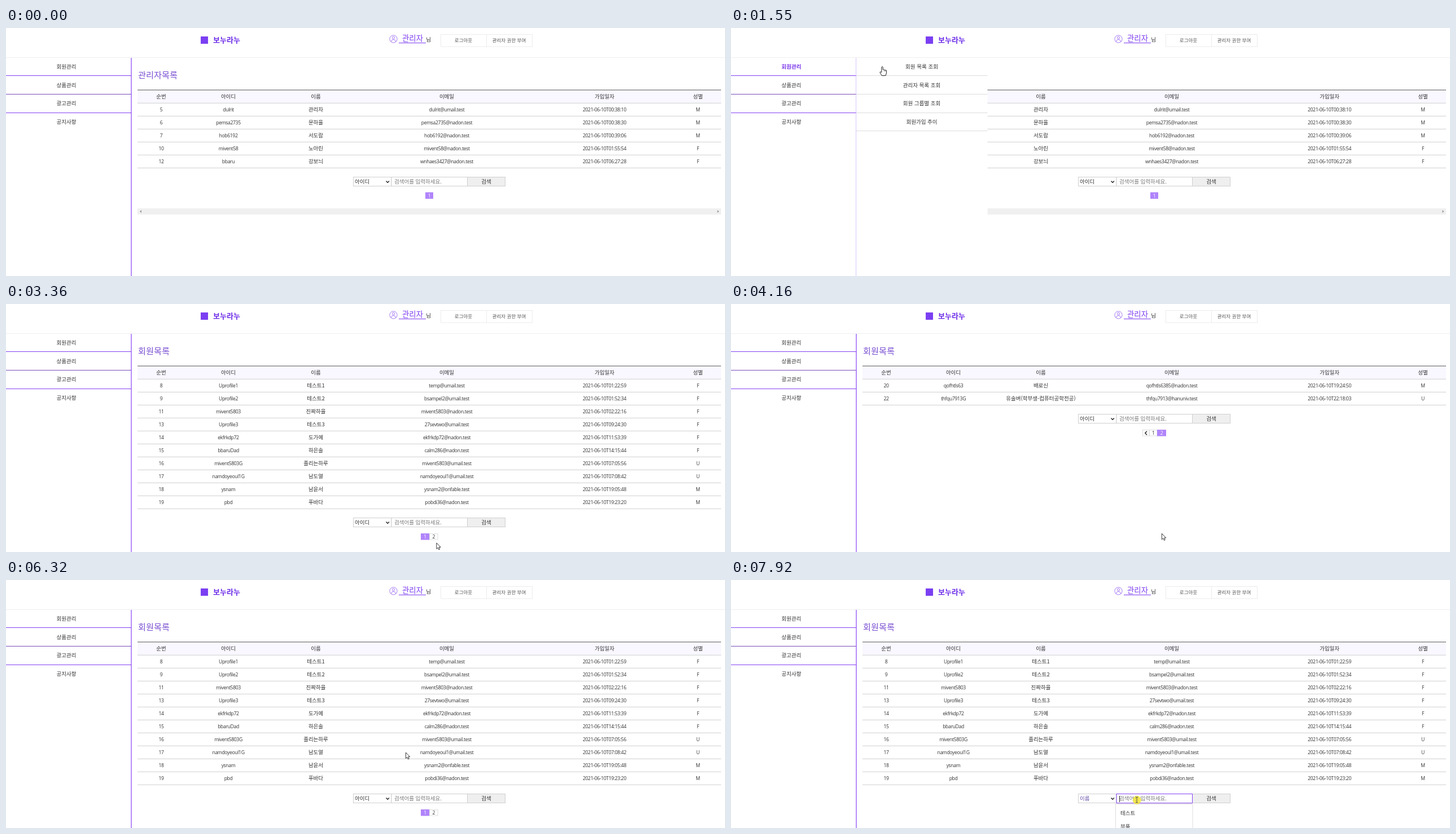
Animation of 1274x440 px, one loop 7.99 s. Source, as an HTML page:

```html
<!DOCTYPE html>
<html lang="ko">
<head>
<meta charset="utf-8">
<title>관리자</title>
<style>
  html, body { margin: 0; width: 100%; height: 100%; overflow: hidden; background: #fff; }
  svg { display: block; width: 100%; height: 100%; }
  text { font-family: "Noto Sans CJK KR", "Noto Sans CJK", sans-serif; font-size: 9.5px; fill: #333; white-space: pre; }
  text.latin { font-family: "Open Sans", "Noto Sans", sans-serif; font-size: 8.6px; letter-spacing: -.35px; }
</style>
</head>
<body>
<svg id="stage" viewBox="0 0 1274 440" preserveAspectRatio="none"></svg>
<script>
const LOOP = 7990;
const PURPLE = '#8440f4', LILAC = '#b084fb', GREY = '#cfcfcf';
const COLUMNS = [275, 394, 549, 781, 1060.5, 1226];
const HEADINGS = ['순번', '아이디', '이름', '이메일', '가입일자', '성별'];
const MENU = ['회원관리', '상품관리', '광고관리', '공지사항'];
const SUBMENU = ['회원 목록 조회', '관리자 목록 조회', '회원 그룹별 조회', '회원가입 추이'];

const ADMINS = `5|dulrit|관리자|dulrit@umail.test|00:38:10|M
6|pemsa2735|문하율|pemsa2735@nadon.test|00:38:30|M
7|hob6192|서도람|hob6192@nadon.test|00:39:06|M
10|mivent58|노아린|mivent58@nadon.test|01:55:54|F
12|bbaru|강보늬|wnhaes3427@nadon.test|06:27:28|F`;
const MEMBERS_1 = `8|Uprofile1|테스트1|temp@umail.test|01:22:59|F
9|Uprofile2|테스트2|bsampel2@umail.test|01:52:34|F
11|mivent5803|진짜하율|mivent5803@nadon.test|02:22:16|F
13|Uprofile3|테스트3|27sevtwo@umail.test|09:24:30|F
14|ekfrkdp72|도가예|ekfrkdp72@nadon.test|11:53:39|F
15|bbaruDad|하은솔|calm286@nadon.test|14:15:44|F
16|mivent5803G|졸리는하루|mivent5803@umail.test|07:05:56|U
17|namdoyeoul1G|남도열|namdoyeoul1@umail.test|07:08:42|U
18|ysnam|남윤서|ysnam2@onfable.test|19:05:48|M
19|pbd|푸바다|pobdi36@nadon.test|19:23:20|M`;
const MEMBERS_2 = `20|qofhtls63|배로신|qofhtls6385@nadon.test|19:24:50|M
22|thfqu7913G|유솔벼(학부생-컴퓨터공학전공)|thfqu7913@hanuniv.test|22:18:03|U`;

// Pointer stops: time, x, y
const PATH = [
  [180, 1098, 392], [330, 960, 320], [600, 420, 120], [780, 150, 43], [930, 112, 64],
  [1000, 122, 68], [1300, 222, 71], [1550, 268, 68], [1900, 272, 70], [2200, 350, 112],
  [2490, 471, 185], [2820, 471, 185], [3150, 690, 360], [3380, 769, 429], [3630, 763, 414],
  [4090, 763, 414], [4160, 763, 407], [4500, 752, 300], [4770, 746, 230], [5230, 746, 230],
  [5790, 739, 231], [6080, 739, 231], [6320, 708, 305], [6560, 700, 400], [6800, 709, 425],
  [6930, 709, 425], [7250, 652, 390], [7340, 652, 390], [7500, 648, 411], [7580, 648, 411],
  [7780, 700, 391], [7850, 719, 390]
];
// Click flashes: start, end
const CLICKS = [[1800, 1880], [3700, 3830], [7850, LOOP]];

function text(str, x, y, opt = {}) {
  const latin = !/[가-힣]/.test(str);
  const size = opt.size || (latin ? 8.6 : 9.5);
  const style = `font-size:${size}px;font-weight:${opt.weight || 400};fill:${opt.fill || '#333'}`;
  return `<text${latin ? ' class="latin"' : ''} x="${x}" y="${y + size * .36}" ` +
    `text-anchor="${opt.anchor || 'middle'}" style="${style}">${str}</text>`;
}
const rect = (x, y, w, h, fill, stroke = 'none') =>
  `<rect x="${x}" y="${y}" width="${w}" height="${h}" fill="${fill}" stroke="${stroke}"/>`;
const line = (x1, y1, x2, y2, stroke, w = 1) =>
  `<path d="M${x1} ${y1}L${x2} ${y2}" stroke="${stroke}" stroke-width="${w}" fill="none"/>`;
const path = (d, stroke, w = 1, fill = 'none') =>
  `<path d="${d}" stroke="${stroke}" stroke-width="${w}" fill="${fill}" stroke-linejoin="round"/>`;
const group = (id, body) => `<g id="${id}">${body}</g>`;
const left = (str, x, y, fill) => text(str, x, y, { anchor: 'start', fill });

function header() {
  return rect(345, 15, 13, 13, '#7b3ff2') +
    text('보누라누', 391, 21, { size: 13, weight: 900, fill: '#6d2ee8' }) +
    `<g fill="none" stroke="#a67af5"><circle cx="686.5" cy="19.5" r="6.6"/><circle cx="686.5" cy="17.3" r="2.1"/>` +
    `<path d="M682.3 24.2Q683 20.4 686.5 20.4T690.7 24.2"/></g>` +
    text('관리자', 720.5, 18.5, { size: 13.4, fill: '#7d3cf0' }) +
    line(696, 26.5, 744, 26.5, '#7d3cf0') +
    text('님', 748.5, 21, { weight: 500 }) +
    rect(770.5, 11.5, 81, 21.5, '#fff', '#ececec') + rect(851.5, 11.5, 81, 21.5, '#fff', '#ececec') +
    text('로그아웃', 810.5, 22, { size: 8.5, fill: '#555' }) +
    text('관리자 권한 부여', 891.5, 22, { size: 8.5, fill: '#555' }) +
    line(0, 52.5, 1274, 52.5, '#eee');
}

function sidebar() {
  let out = '';
  MENU.forEach((label, i) => {
    const y = 69 + 32.5 * i;
    out += i ? text(label, 107, y)
      : group('menuOff', text(label, 107, y)) +
        group('menuOn', text(label, 107, y, { weight: 700, fill: '#7a35ea' }));
    if (i < 3) out += line(0, Math.floor(y + 16) + .5 - (i == 0), 222, Math.floor(y + 16) + .5 - (i == 0), i == 1 ? '#7a4cb8' : PURPLE);
  });
  return out + line(222, 53, 222, 440, PURPLE, 1.2);
}

function submenu() {
  return rect(221.5, 53, 233, 387, '#fff') + SUBMENU.map((label, i) => {
    const y = 69 + 32.5 * i;
    return text(label, 338, y) + line(222, Math.floor(y + 16) + .5 - (i == 0), 454.5, Math.floor(y + 16) + .5 - (i == 0), '#ddd');
  }).join('');
}

function pageBox(label, x, y, w, on) {
  return rect(x + .5, y + .5, w - 1, 10.5, on ? LILAC : '#fff', on ? LILAC : '#ddd') +
    text(label, x + w / 2, y + 6, { fill: on ? '#fff' : '#333' });
}

function page(id, title, data, pager) {
  const rows = data.split('\n').map(r => r.split('|'));
  const bottom = 133 + 23 * rows.length, top = bottom + 17, mid = top + 8;
  let out = text(title, 234, 84, { size: 15.2, weight: 500, fill: '#7a50d2', anchor: 'start' }) +
    rect(233, 110, 1034, 23, '#f9f7ff') + line(233, 110, 1267, 110, '#555', 1.2) +
    line(233, 133.3, 1267, 133.3, GREY);
  HEADINGS.forEach((h, i) => out += text(h, COLUMNS[i], 121.5));
  rows.forEach((row, r) => {
    row[4] = '2021-06-10T' + row[4];
    row.forEach((cell, i) => out += text(cell, COLUMNS[i], 145 + 23 * r));
    out += line(233, 156.3 + 23 * r, 1267, 156.3 + 23 * r, GREY);
  });
  out += rect(615.5, top - .5, 67.5, 16, '#fff', GREY) + rect(683, top - .5, 134.5, 16, '#fff', GREY) +
    rect(817.5, top - .5, 67, 16, '#efefef', GREY) +
    group(id + 'Id', left('아이디', 618, mid)) +
    path(`M673.5 ${mid - 1.5}l2.7 2.7 2.7-2.7`, '#222', 1.4) +
    left('검색어를 입력하세요.', 688, mid, '#7b7b7b') + text('검색', 851, mid);
  return group(id, out + pager(top + 27));
}

function scrollbar() {
  return rect(233, 320, 1034, 11, '#f0f0f0') +
    path('M240 323v5l-3-2.5z', 'none', 0, '#999') + path('M1260.5 323v5l3-2.5z', 'none', 0, '#999');
}

const prevButton = (y, color) => rect(729.5, y + .5, 11.5, 10.5, '#fff', color[0]) +
  path(`M737 ${y + 2.8}l-3.2 3.2 3.2 3.2`, color[1], 1.4);

function dropdown() {
  return rect(614.5, 396.5, 68.5, 41, '#fff', '#888') +
    group('pick0', rect(615, 397, 67.5, 13.5, '#1e72d8')) + group('pick1', rect(615, 410.5, 67.5, 13.5, '#1e72d8')) +
    ['아이디', '이름', '이메일'].map((s, i) => left(s, 618, 403.7 + 13.5 * i)).join('');
}

function suggestions() {
  return path('M683 379.5H817.5V395.8H683Z', PURPLE) + line(688.5, 383, 688.5, 394, '#222') +
    rect(681.5, 397.5, 136.5, 60, '#fff', '#dcdcdc') +
    left('테스트', 690, 414) + left('부품', 690, 438);
}

const stage = document.getElementById('stage');
stage.innerHTML = rect(0, 0, 1274, 440, '#fff') + header() + sidebar() +
  page('admins', '관리자목록', ADMINS, y => pageBox('1', 743, y - .5, 14, true) + scrollbar()) +
  page('first', '회원목록', MEMBERS_1, y => pageBox('1', 735, y, 15, true) + pageBox('2', 750, y, 15.5)) +
  page('second', '회원목록', MEMBERS_2, y => pageBox('1', 741, y, 14.5) + pageBox('2', 755, y, 16, true) +
    group('prevOff', prevButton(y, ['#ddd', '#222'])) + group('prevOn', prevButton(y, [LILAC, PURPLE]))) +
  group('submenu', submenu()) +
  group('nameValue', left('이름', 618, 388, '#6750a8')) +
  group('dropdown', dropdown()) + group('suggest', suggestions()) +
  group('pointer',
    `<circle id="flash" cx=".3" cy=".5" r="7.5" fill="#f2e42c" opacity=".8"/>` +
    group('arrow', path('M.4 .6V11.2L2.8 9 4.4 12.6 6.2 11.8 4.6 8.3H7.8Z', '#222', .9, '#fff')) +
    group('hand', path('M-1.2 1.4Q0 -.5 1.2 1.4V6Q2.5 5 3.4 6.4Q4.8 5.4 5.6 6.9Q7.3 6.2 7.4 8V12L6 16.5H-.8L-4 11Q-4.6 8.6 -1.2 10.8Z', '#222', 1, '#fff') +
      path('M3.4 6.4V9M5.6 7V9', '#222', .7)) +
    group('beam', path('M-2 -4.5H2M0 -4.5V4.5M-2 4.5H2', '#555', .9)));

const parts = {};
stage.querySelectorAll('[id]').forEach(el => parts[el.id] = el);
const show = (id, on) => parts[id].style.display = on ? '' : 'none';

function pointerAt(t) {
  const i = PATH.findIndex(p => p[0] > t);
  if (i < 0) return PATH[PATH.length - 1].slice(1);
  if (i == 0) return PATH[0].slice(1);
  const [t0, x0, y0] = PATH[i - 1], [t1, x1, y1] = PATH[i];
  const k = (t - t0) / (t1 - t0);
  return [x0 + (x1 - x0) * k, y0 + (y1 - y0) * k];
}

function draw(t) {
  const [x, y] = pointerAt(t);
  const between = (a, b) => t >= a && t < b;
  const menuOpen = between(930, 2450), second = between(4030, 6080);
  const picked = t >= 7570;

  show('admins', t < 2630);
  show('first', t >= 2630 && !second);
  show('second', second);
  show('menuOn', menuOpen);
  show('menuOff', !menuOpen);
  show('submenu', between(1000, 2450));
  show('prevOn', x < 741);
  show('prevOff', x >= 741);
  show('firstId', !picked);
  show('nameValue', picked);
  show('dropdown', between(7320, 7570));
  show('pick0', t < 7440);
  show('pick1', t >= 7440);
  show('suggest', t >= 7850);

  const beam = t >= 7690;
  const hand = (menuOpen && y < 183) || between(3560, 4090) || between(4840, 6080);
  show('pointer', t >= 180);
  show('beam', beam);
  show('hand', hand);
  show('arrow', !hand && !beam);
  show('flash', CLICKS.some(c => between(c[0], c[1])));
  parts.pointer.setAttribute('transform', `translate(${x.toFixed(2)} ${y.toFixed(2)})`);
}

const start = performance.now();
function tick() {
  draw((performance.now() - start) % LOOP);
  requestAnimationFrame(tick);
}
tick();
</script>
</body>
</html>
```
